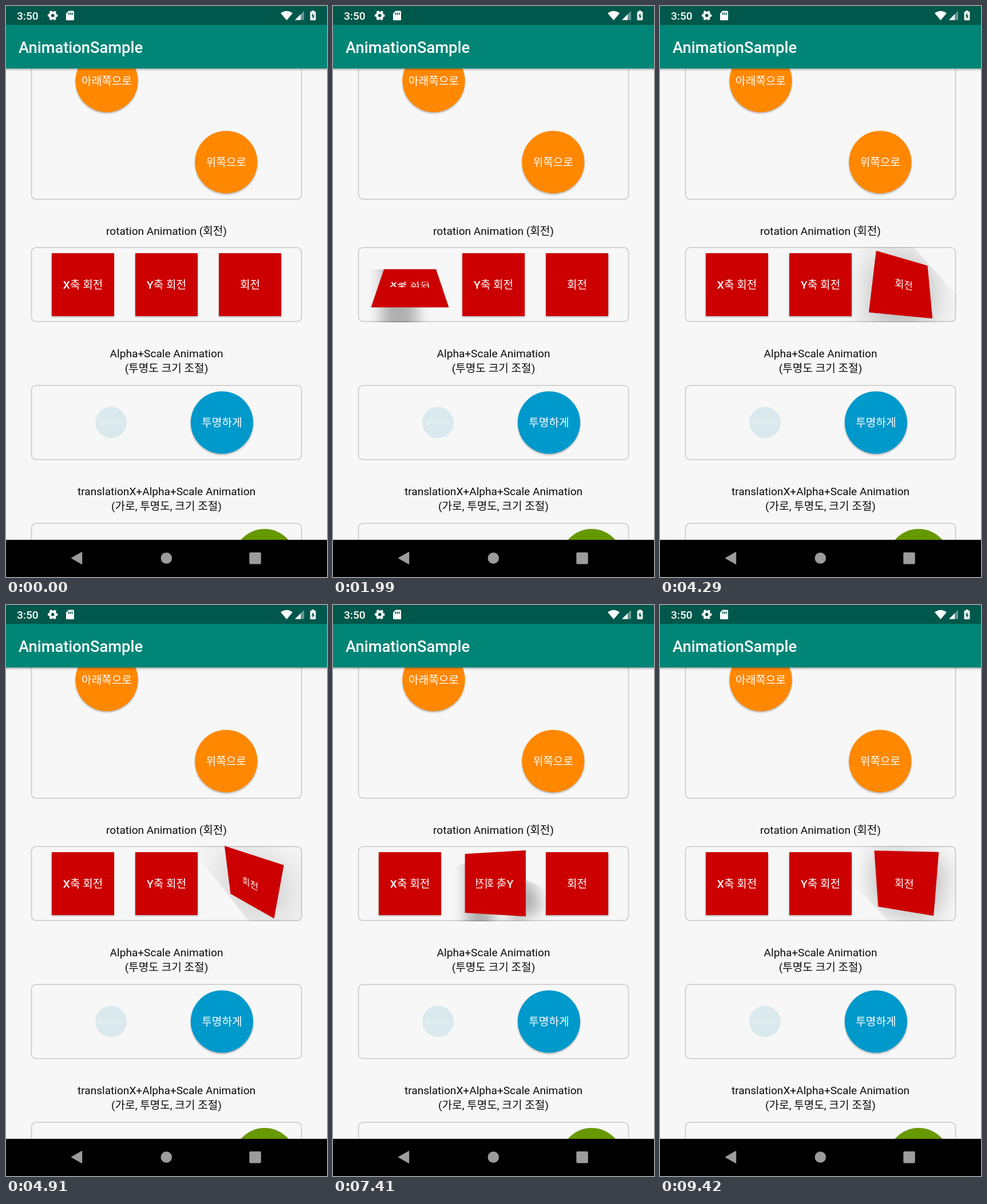
Recreate the animation shown at these times as an HTML page. Size 561x998 px, loop 9.5 s.

```html
<!DOCTYPE html>
<html lang="ko">
<head>
<meta charset="utf-8">
<title>AnimationSample</title>
<style>
html, body { margin: 0; width: 100%; height: 100%; overflow: hidden; background: #f7f7f7; }
svg { position: absolute; display: block; }
text { font-family: Roboto, "Noto Sans CJK KR", "Noto Sans CJK", sans-serif; font-size: 19.1px; text-anchor: middle; }
.medium { font-weight: 500; }
#screen { left: 0; top: 0; }
#row { position: absolute; left: 44px; top: 421px; width: 474px; height: 132px; overflow: hidden; }
#shadows { left: -44px; top: -421px; }
.tile { width: 109.2px; height: 109.2px; background: #c00; }
.card { fill: none; stroke: #c7c7c7; stroke-width: 1.5; }
.drop { filter: blur(1.7px); opacity: .28; }
</style>
</head>
<body>
<svg id="screen" width="561" height="998" viewBox="0 0 561 998">
  <defs>
    <linearGradient id="barShade" x2="0" y2="1">
      <stop offset="0" stop-opacity=".26"/>
      <stop offset="1" stop-opacity="0"/>
    </linearGradient>
  </defs>
  <rect width="561" height="998" fill="#f7f7f7"/>
  <g class="card">
    <rect x="44.5" y="60" width="472" height="277.7" rx="8"/>
    <rect x="44.5" y="422.2" width="472" height="129.3" rx="8"/>
    <rect x="44.5" y="663.2" width="472" height="129.6" rx="8"/>
    <rect x="44.5" y="904.3" width="472" height="130" rx="8"/>
  </g>
  <g id="discs"></g>
  <circle cx="183.5" cy="728" r="27.4" fill="#dae9ee"/>
  <text x="183.5" y="731.5" fill="#eaf2f5" style="font-size:9.6px">불투명하게</text>
  <g fill="#0a0a0a">
    <text x="280.5" y="399.5">rotation Animation (회전)</text>
    <text x="280.5" y="613.5">Alpha+Scale Animation</text>
    <text x="280.5" y="640">(투명도 크기 조절)</text>
    <text x="280.5" y="854.5">translationX+Alpha+Scale Animation</text>
    <text x="280.5" y="881">(가로, 투명도, 크기 조절)</text>
  </g>

  <rect y="109" width="561" height="5" fill="url(#barShade)"/>
  <rect y="33" width="561" height="76.3" fill="#008577"/>
  <rect width="561" height="33" fill="#00574b"/>
  <text class="medium" x="22" y="81.5" fill="#fff" style="font-size:27.3px;text-anchor:start">AnimationSample</text>
  <g fill="#fff">
    <text class="medium" x="19" y="23.5" style="font-size:19.1px;text-anchor:start">3:50</text>
    <g transform="translate(81.7 16.6)">
      <circle r="4.9" fill="none" stroke="#fff" stroke-width="4"/>
      <circle r="7.2" fill="none" stroke="#fff" stroke-width="3" stroke-dasharray="4.1 3.44" stroke-dashoffset="2.05"/>
    </g>
    <path d="M109.5 8.5H117.5Q119 8.5 119 10V23.5Q119 25 117.5 25H106.5Q105 25 105 23.5V13Z"/>
    <path d="M108.6 11.5h1.7v4h-1.7zM111.7 11.5h1.7v4h-1.7zM114.8 11.5h1.7v4h-1.7z" fill="#00574b"/>
    <path d="M480 12.6Q490.5 5 501 12.6L490.5 25Z"/>
    <path d="M521 8.5V24.5H505Z" opacity=".38"/>
    <path d="M515 14.5V24.5H505Z"/>
    <path d="M534.5 9.7V8H538.5V9.7H540Q541.4 9.7 541.4 11V23.7Q541.4 25 540 25H533Q531.6 25 531.6 23.7V11Q531.6 9.7 533 9.7Z"/>
    <path d="M537.2 12L533.7 18.2H535.9V23L539.4 16.7H537.2Z" fill="#00574b"/>
  </g>
  <rect y="933" width="561" height="65" fill="#000"/>
  <g fill="#9c9c9c">
    <path d="M114.5 965L132.5 954.8V975.2Z" stroke="#9c9c9c" stroke-width="1.4" stroke-linejoin="round"/>
    <circle cx="280.3" cy="965" r="9.8"/>
    <rect x="425.3" y="955" width="20.4" height="20.4" rx="1.8"/>
  </g>
</svg>
<div id="row"><svg id="shadows" width="561" height="998"></svg></div>

<script>
const NS = 'http://www.w3.org/2000/svg';
const HALF = 54.6, CY = 487, EYE = 222;
const LIGHT = { x: 280.5, y: 0, z: 819, r: 1092 };
const REST_Z = 2.7, PRESSED_Z = 8.2;
const SPIN = 1000, PRESS = 110, STALL_AT = 9140, STALL = 150, LAST = 9270;
const LOOP = 9500;

function make(parent, tag, attrs, text) {
  const el = document.createElementNS(NS, tag);
  for (const key in attrs) el.setAttribute(key, attrs[key]);
  if (text) el.textContent = text;
  return parent.appendChild(el);
}

const discs = document.getElementById('discs');
[
  [176, 131, '#ff8800', '아래쪽으로'],
  [384.8, 272.8, '#ff8800', '위쪽으로'],
  [377.4, 728, '#0099cc', '투명하게'],
  [452, 968.7, '#669900', '']
].forEach(([cx, cy, fill, label]) => {
  make(discs, 'circle', { cx, cy: cy + 2, r: HALF, class: 'drop' });
  make(discs, 'circle', { cx, cy, r: HALF, fill });
  make(discs, 'text', { x: cx, y: cy + 7, fill: '#fff' }, label);
});

const row = document.getElementById('row');
const shadows = document.getElementById('shadows');

function makeTile(cx, latin, label, turnX, turnY, starts) {
  const clip = make(shadows, 'clipPath', { id: 'clip' + cx | 0 ? '' : 'clip' + Math.round(cx) });
  const area = make(clip, 'path', {});
  const group = make(shadows, 'g', { 'clip-path': `url(#${clip.id})` });
  const shade = make(group, 'path', {});
  const face = make(row, 'svg', { class: 'tile', viewBox: '0 0 109.2 109.2' });
  face.style.left = cx - HALF - 44 + 'px';
  face.style.top = CY - HALF - 421 + 'px';
  const text = make(face, 'text', { x: HALF, y: HALF + 7, fill: '#fff' });
  if (latin) make(text, 'tspan', { class: 'medium' }, latin);
  make(text, 'tspan', {}, label);
  return { cx, turnX, turnY, starts, area, shade, face };
}

const tiles = [
  makeTile(134.7, 'X', '축 회전', 1, 0, [1394, 5592]),
  makeTile(280.4, 'Y', '축 회전', 0, 1, [2804, 6935]),
  makeTile(426.3, '', '회전', 1, 1, [4120, 8413])
];

const path = pts => 'M' + pts.map(p => p[0].toFixed(2) + ' ' + p[1].toFixed(2)).join('L') + 'Z';
const ALL = 'M0 0H561V998H0Z';

function pose(tile, t) {
  let angle = 0, z = REST_Z;
  for (const start of tile.starts) {
    const dt = t - start;
    if (dt < -PRESS || dt > SPIN) continue;
    const p = Math.max(0, dt / SPIN);
    angle = Math.PI * (1 - Math.cos(Math.PI * p));
    const lift = dt < 0 ? (dt + PRESS) / PRESS : Math.max(0, 1 - dt / PRESS);
    z += (PRESSED_Z - REST_Z) * lift;
  }
  return { angle, z };
}

// Rotate a corner about Y, then X, and project it.
function corner(tile, x, y, ax, ay) {
  const px = x * Math.cos(ay), pz = -x * Math.sin(ay);
  const py = y * Math.cos(ax) - pz * Math.sin(ax);
  const z = y * Math.sin(ax) + pz * Math.cos(ax);
  const k = EYE / (EYE - z);
  return [tile.cx + px * k, CY + py * k, z];
}

function drawShadow(tile, ax, ay, lift) {
  const { cx } = tile;
  const quad = [[-1, -1], [1, -1], [1, 1], [-1, 1]]
    .map(([x, y]) => corner(tile, x * HALF, y * HALF, ax, ay));
  const side = Math.cos(ax) * Math.cos(ay) < 0 ? -1 : 1;
  // Screen direction in which the tile comes nearer.
  let gx = -Math.sin(ay) * side, gy = Math.cos(ay) * Math.sin(ax) * side;
  const slope = Math.hypot(gx, gy);
  let shape, area = ALL, blur, alpha = .29;

  if (slope > .01) {
    gx /= slope; gy /= slope;
    const reach = Math.min(...quad.map(p => (p[0] - cx) * gx + (p[1] - CY) * gy)) - (side > 0 ? 4 : 0);
    const at = (u, v) => [cx + gx * u - gy * v, CY + gy * u + gx * v];
    area = path([at(reach, -500), at(reach, 500), at(900, 500), at(900, -500)]);
  }

  if (side > 0) {
    const top = Math.max(...quad.map(p => p[2])) + lift;
    blur = .45 * LIGHT.r * top / (LIGHT.z - top);
    shape = path(quad.map(([x, y, z]) => {
      const h = Math.max(0, z + lift), f = h / (LIGHT.z - h);
      return [x + f * (x - LIGHT.x), y + f * (y - LIGHT.y)];
    }));
  } else if (tile.turnX) {
    const s = Math.sign(gy);
    blur = 13;
    shape = path([[cx - 50, CY - s * 60], [cx + 12, CY - s * 60], [cx + 12, CY + s * 95], [cx - 50, CY + s * 95]]);
  } else {
    const s = Math.sign(gx);
    blur = 12;
    shape = path([[cx, 430], [cx - s * 48, 430], [cx - s * 48, 580], [cx, 580]]) +
      path([[cx + s * 30, 465], [cx + s * 70, 490], [cx + s * 85, 530], [cx + s * 30, 560]]);
    area = path([[cx + s * 120, 508], [cx + s * 40, 473], [cx, 441], [cx - s * 28, 441],
      [cx - s * 100, 473], [cx - s * 100, 600], [cx + s * 120, 600]]);
  }
  tile.area.setAttribute('d', area);
  tile.shade.setAttribute('d', shape);
  tile.shade.style.filter = `blur(${blur.toFixed(2)}px)`;
  tile.shade.style.opacity = alpha;
}

function render(time) {
  let t = time % LOOP;
  if (t > STALL_AT) t = Math.min(LAST, Math.max(STALL_AT, t - STALL));
  for (const tile of tiles) {
    const { angle, z } = pose(tile, t);
    const ax = angle * tile.turnX, ay = angle * tile.turnY;
    tile.face.style.transform = angle
      ? `perspective(${EYE}px) rotateX(${ax}rad) rotateY(${ay}rad)` : 'none';
    drawShadow(tile, ax, ay, z);
  }
}

const begin = performance.now();
function tick() {
  render(performance.now() - begin);
  requestAnimationFrame(tick);
}
tick();
</script>
</body>
</html>
```
